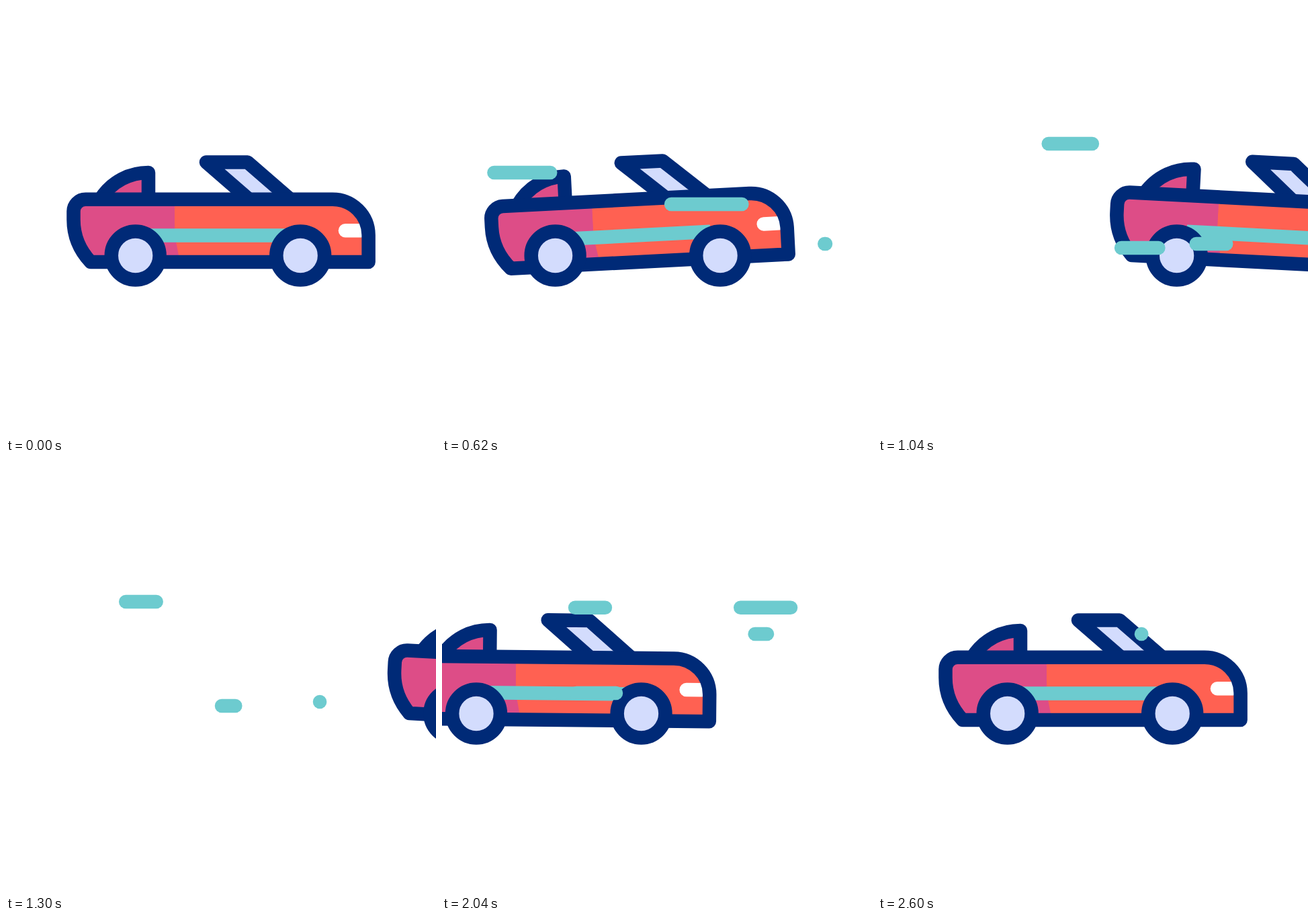
An HTML page that plays this animation: 640 px wide and 640 px high, repeating every 2800 ms.

```html
<!DOCTYPE html>
<html lang="en">
<head>
<meta charset="utf-8">
<title>Convertible</title>
<style>
  html, body { margin: 0; height: 100%; overflow: hidden; background: #fff; }
  svg { display: block; width: 100%; height: 100%; }
  .line { stroke: #002a77; stroke-width: 20.5; stroke-linejoin: round; }
  .teal { stroke: #6dcbcf; stroke-width: 20.5; }
  .pink { fill: #dd4d87; }
  .pale { fill: #d3dcfd; }
</style>
</head>
<body>
<svg viewBox="0 0 640 640">
  <defs>
    <path id="shell" d="M126 381C110 364 100.5 343 100.5 318V306A18 18 0 0 1 118.5 287.7H486A53.6 53.6 0 0 1 539.6 341V381Z"/>
    <clipPath id="front"><path d="M251 280H560V390H260C257 365 251 350 251 325Z"/></clipPath>
  </defs>
  <g id="car">
    <g id="body">
      <path class="line pink" d="M140 288C158 260 185 248 212 248V288"/>
      <path class="line pale" d="M362 288L298 232.5H359.5L423.5 288"/>
      <use href="#shell" class="pink"/>
      <use href="#shell" fill="#ff6152" clip-path="url(#front)"/>
      <path class="teal" d="M206 341.4H425"/>
      <path stroke="#fff" stroke-width="20.5" stroke-linecap="round" d="M505 334.2H528"/>
      <use href="#shell" class="line" fill="none"/>
    </g>
    <g class="line pale">
      <circle cx="192.7" cy="371.5" r="35.9"/>
      <circle cx="438.2" cy="371.5" r="35.9"/>
    </g>
  </g>
  <g id="wind" class="teal" stroke-linecap="round"></g>
</svg>
<script>
const LOOP = 2800;
const SWEEP = 545; // time an end of a streak takes to cross its path
const LAG = 186;   // delay of the tail behind the head
const car = document.getElementById('car');
const body = document.getElementById('body');
const wind = document.getElementById('wind');

function ease(t, start, end) {
  const u = Math.min(1, Math.max(0, (t - start) / (end - start)));
  return u * u * (3 - 2 * u);
}

// Back up, lean forward and race off to the right.
function leave(t) {
  const windUp = ease(t, 200, 600);
  return {
    x: -25 * windUp + 571 * ease(t, 600, 1500),
    tilt: -3 * windUp + 6 * ease(t, 600, 1050)
  };
}

// Come in from the left, brake past the middle and settle.
function enter(t) {
  const settle = ease(t, 2300, 2600);
  return {
    x: -564 + 588 * ease(t, 1560, 2300) - 24 * settle,
    tilt: 2 * (ease(t, 1900, 2300) - settle)
  };
}

// A line that grows leftwards from x, then shrinks towards its far end.
function streak(x, y, length, start) {
  const el = document.createElementNS('http://www.w3.org/2000/svg', 'path');
  wind.append(el);
  return t => {
    const age = t - start;
    const head = x - length * ease(age, 0, SWEEP);
    const tail = x - length * ease(age, LAG, LAG + SWEEP);
    const visible = age > 0 && age < LAG + SWEEP;
    el.setAttribute('d', visible ? `M${tail} ${y}H${head}` : '');
  };
}

const streaks = [
  streak(232, 248, 178, 200),
  streak(501, 295, 214, 255),
  streak(571, 354, 104, 580),
  streak(436, 360, 115, 716),
  streak(329, 205, 151, 769),
  streak(570, 213.7, 154, 1645),
  streak(257, 213.7, 94, 1722),
  streak(261, 341, 169, 1820),
  streak(484, 253, 92, 1885)
];

function draw(t) {
  const { x, tilt } = t < 1500 ? leave(t) : enter(t);
  car.setAttribute('transform', `translate(${x} 0)`);
  body.setAttribute('transform', `rotate(${tilt} 315.5 371)`);
  streaks.forEach(update => update(t));
}

const begin = performance.now();
function tick() {
  draw((performance.now() - begin) % LOOP);
  requestAnimationFrame(tick);
}
tick();
</script>
</body>
</html>
```
